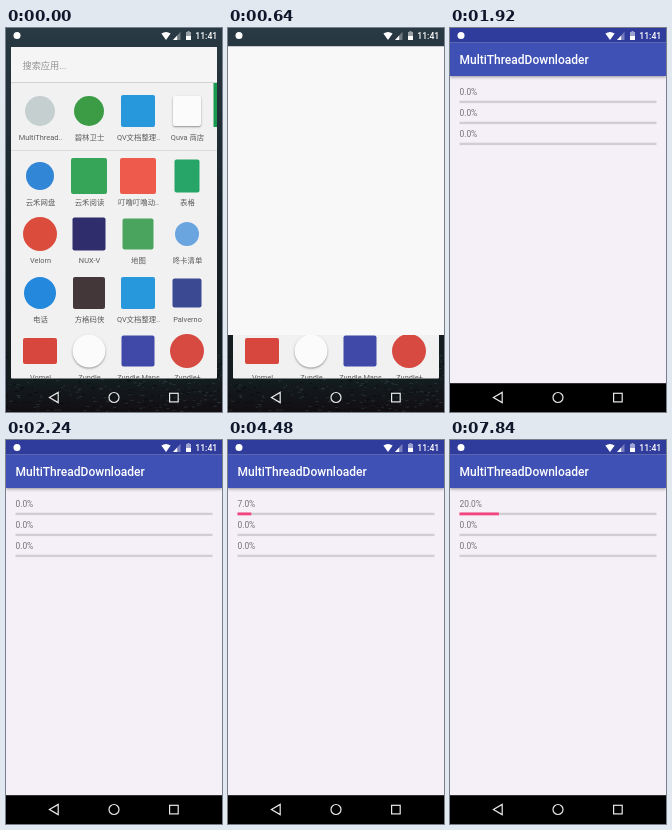
Animation, 216 px wide and 384 px high, one loop 8000 ms. Source, as an HTML page with a canvas:

```html
<!DOCTYPE html>
<html lang="zh">
<head>
<meta charset="utf-8">
<style>
html, body { margin: 0; width: 100%; height: 100%; overflow: hidden; background: #000; }
canvas { display: block; width: 216px; height: 384px; }
</style>
</head>
<body>
<canvas id="stage" width="216" height="384"></canvas>
<script>
const W = 216, H = 384, LOOP = 8000, STEP = 160;
const STATUS = 14.4, NAV = 355.2;
const c = document.getElementById('stage').getContext('2d');

// label, colour, shape (c = circle, s = square), width, height
const apps = [
  ['MultiThread..', '#c6cfcf', 'c', 30, 30], ['碧林卫士', '#3c9c45', 'c', 30, 30],
  ['QV文档整理..', '#2798dc', 's', 34, 32], ['Quva 商店', '#fbfbfb', 's', 28, 30],
  ['云禾网盘', '#3286d6', 'c', 28, 28], ['云禾阅读', '#37a557', 's', 36, 36],
  ['叮噜叮噜动..', '#ee5b4c', 's', 36, 36], ['表格', '#27a467', 's', 25, 33],
  ['Velorn', '#db4c3d', 'c', 34, 34], ['NUX-V', '#302d6c', 's', 33, 33],
  ['地图', '#4ba45e', 's', 31, 31], ['咚卡清单', '#6aa5df', 'c', 24, 24],
  ['电话', '#2488dc', 'c', 32, 32], ['方格码侠', '#43373a', 's', 32, 32],
  ['QV文档整理..', '#2798dc', 's', 34, 32], ['Palverno', '#3b4992', 's', 29, 29],
  ['Vomel', '#d8473d', 's', 34, 26], ['Zundle', '#fbfbfb', 'c', 33, 33],
  ['Zundle Maps', '#4049a8', 's', 33, 31], ['Zundle+', '#d64a41', 'c', 34, 34]
];
const rowY = [83, 148, 206, 265, 323];

// start time and percent reached
const progress = [
  [3680, 2], [3840, 4], [4000, 6], [4480, 7], [4640, 8], [4960, 9], [5120, 10],
  [5280, 11], [5440, 12], [5600, 13], [6080, 14], [6400, 15], [6560, 16],
  [7200, 17], [7360, 18], [7680, 19], [7840, 20]
];

const clamp = v => Math.max(0, Math.min(1, v));

function rect(x, y, w, h, fill) {
  c.fillStyle = fill;
  c.fillRect(x, y, w, h);
}

function text(s, x, y, size, fill, align = 'left', weight = 400) {
  c.font = `${weight} ${size}px Roboto, "Noto Sans CJK SC", "Noto Sans CJK", sans-serif`;
  c.textAlign = align;
  c.fillStyle = fill;
  c.fillText(s, x, y);
}

function poly(...p) {
  c.beginPath();
  for (let i = 0; i < p.length; i += 2) c.lineTo(p[i], p[i + 1]);
  c.closePath();
}

function shadow(color, blur, y) {
  c.shadowColor = color;
  c.shadowBlur = blur;
  c.shadowOffsetY = y;
}

function wallpaper() {
  const g = c.createLinearGradient(0, 0, 0, H);
  g.addColorStop(0, '#293a45');
  g.addColorStop(.06, '#26363f');
  g.addColorStop(.5, '#182328');
  g.addColorStop(.92, '#131c1f');
  g.addColorStop(1, '#120e12');
  rect(0, 0, W, H, g);
  let seed = 7;
  const rnd = () => (seed = seed * 16807 % 2147483647) / 2147483647;
  for (let i = 0; i < 420; i++) {
    rect(rnd() * W, 320 + rnd() * 64, 1 + rnd() * 3, 1, rnd() < .5 ? '#00000077' : '#58767a44');
  }
}

function icon([label, color, shape, w, h], i) {
  const x = 34 + i % 4 * 49, y = rowY[i >> 2];
  c.save();
  if (color === '#fbfbfb') shadow('#0006', 2, 1);
  c.fillStyle = color;
  c.beginPath();
  if (shape === 'c') c.arc(x, y, w / 2, 0, 7);
  else c.roundRect(x - w / 2, y - h / 2, w, h, 2);
  c.fill();
  c.restore();
  text(label, x + .5, y + 28.5, 7.4, '#5c5c5c', 'center');
}

function launcher() {
  wallpaper();
  c.save();
  c.beginPath();
  c.roundRect(5, 19, 206, 331.5, 1);
  c.clip();
  rect(5, 19, 206, 332, '#f1f1f1');
  rect(5, 19, 206, 35, '#f5f5f5');
  rect(5, 54, 206, 1, '#d2d2d2');
  rect(5, 122, 206, 1, '#dcdcdc');
  text('搜索应用...', 16.5, 41, 9.2, '#959595');
  apps.forEach(icon);
  rect(207.5, 55, 3.5, 44, '#159a50');
  c.restore();
}

function appContent(pct) {
  c.save();
  shadow('#0006', 3, 1);
  rect(0, STATUS, W, 33.6, '#3f51b5');
  c.restore();
  text('MultiThreadDownloader', 9.5, 36, 12, '#fff', 'left', 500);
  [pct, 0, 0].forEach((p, i) => {
    const y = 21 * i;
    text(p.toFixed(1) + '%', 9.5, y + 67, 8.4, '#747078');
    rect(9.5, y + 72.7, 197, 2.4, '#d0ced3');
    if (p) rect(9.5, y + 72.5, 1.97 * p, 2.8, '#f4447f');
  });
}

function appWindow(t) {
  // the window is uncovered from the tapped icon outwards
  const age = t - 312;
  const rest = t >= 1440 ? 0 : Math.exp(-age / 251);
  const side = Math.exp(-age / 65);
  const top = 67 * rest, left = side < .02 ? 0 : 19 * side;
  const bottom = H - 284 * rest, right = side < .02 ? W : W - 167 * side;
  c.save();
  c.beginPath();
  c.rect(left, top, right - left, bottom - top);
  c.clip();
  const k = clamp((t - 640) / 640);
  rect(0, 0, W, H, `rgb(${248 - 3 * k}, ${248 - 8 * k}, ${248 - k})`);
  c.globalAlpha = clamp((t - 1440) / 480);
  const reached = progress.filter(p => p[0] <= t).pop();
  if (c.globalAlpha) appContent(reached ? reached[1] : 0);
  c.globalAlpha = 1;
  rect(0, 0, W, STATUS, '#303c9c');
  rect(0, NAV, W, H - NAV, '#000');
  c.restore();
}

function systemBars() {
  // status icons
  c.fillStyle = '#fff';
  c.beginPath();
  c.arc(11, 7.5, 3.5, 0, 7);
  c.fill();
  c.beginPath();
  c.moveTo(160, 12);
  c.lineTo(155.4, 5.6);
  c.quadraticCurveTo(160, 2.6, 164.6, 5.6);
  c.fill();
  c.fillStyle = '#ffffff55';
  poly(167, 12, 174.5, 12, 174.5, 3.8);
  c.fill();
  c.fillStyle = '#fff';
  poly(167, 12, 171.2, 12, 171.2, 7.4);
  c.fill();
  rect(180, 4, 5, 8, '#ffffff88');
  rect(181.5, 3, 2, 1, '#ffffff88');
  rect(180, 8, 5, 4, '#fff');
  text('11:41', 211.3, 10.6, 8.7, '#fff', 'right', 500);

  // navigation keys
  c.strokeStyle = '#e8e8e8';
  c.lineWidth = 1.2;
  poly(43.4, 369.5, 52.2, 364.4, 52.2, 374.6);
  c.stroke();
  c.beginPath();
  c.arc(108, 369.5, 5, 0, 7);
  c.stroke();
  c.strokeRect(163.6, 365.3, 8.6, 8.6);
}

function draw(now) {
  const t = Math.floor(now % LOOP / STEP) * STEP;
  if (t < 1440) launcher();
  if (t > 312) appWindow(t);
  systemBars();
  requestAnimationFrame(draw);
}
requestAnimationFrame(draw);
</script>
</body>
</html>
```
